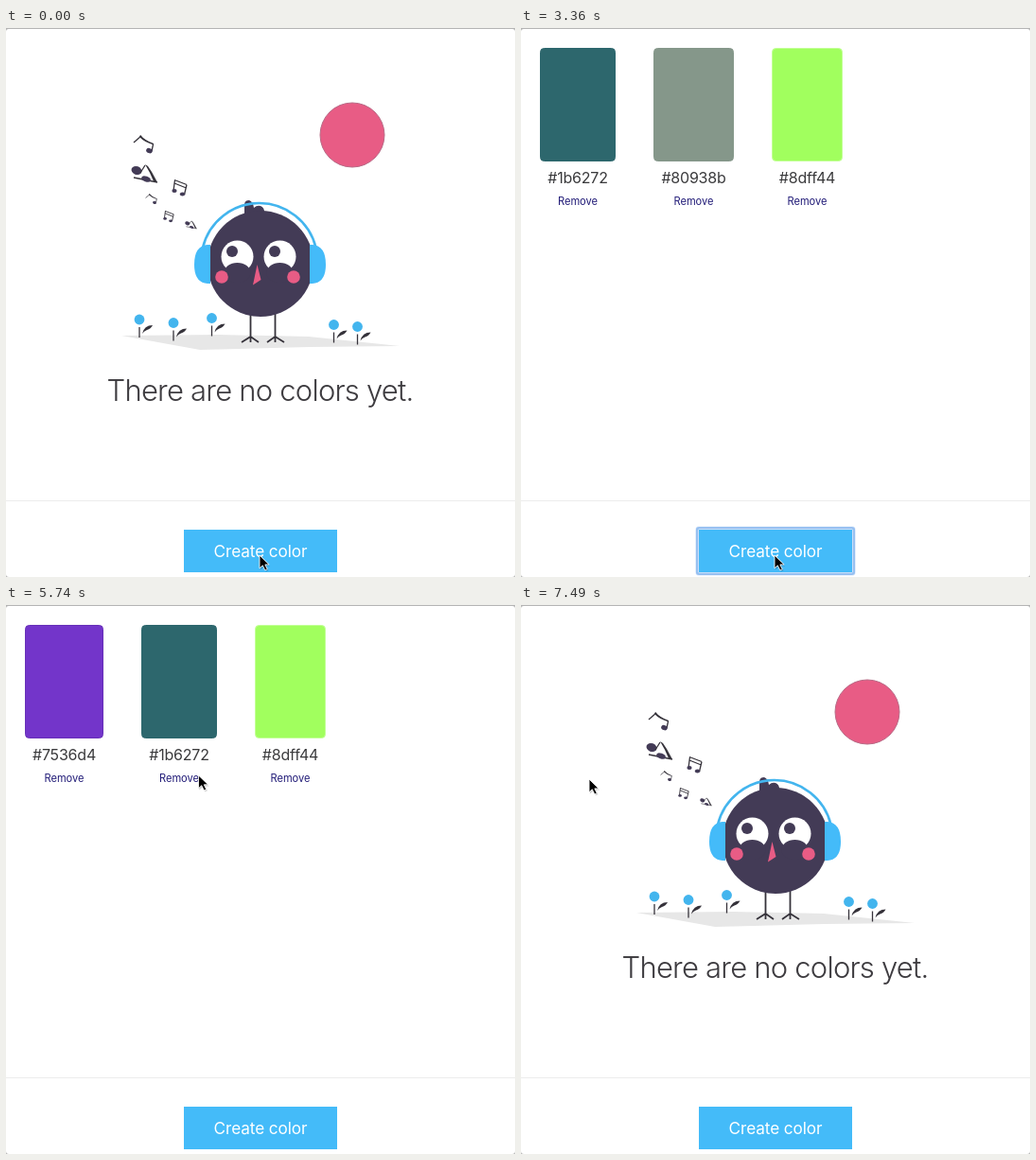
An HTML page that plays this animation: 538x580 px, repeating every 7560 ms.

```html
<!DOCTYPE html>
<html lang="en">
<head>
<meta charset="utf-8">
<title>Color list</title>
<style>
html, body { margin: 0; width: 100%; height: 100%; overflow: hidden; background: #fff; }
svg { display: block; font-family: Inter, Roboto, sans-serif; text-anchor: middle; }
.dark { fill: #433b56; }
.ink { fill: #36333b; }
.pink { fill: #e85c85; }
.sky { fill: #44bbf9; }
.line { fill: none; stroke: #36333b; stroke-width: 1.8; }
.thin { fill: none; stroke: #36333b; stroke-width: 1.3; }
.title { font-size: 31px; font-weight: 300; letter-spacing: -.78px; fill: #3e3c40; }
.label { font-size: 17.2px; letter-spacing: -.1px; fill: #fff; }
.hex { font-size: 16px; letter-spacing: -.2px; fill: #3a3a3c; }
.remove { font-size: 11.1px; fill: #221c78; }
.ring { fill: none; stroke: #97c0f1; stroke-width: 2.6; }
.glow { fill: none; stroke: #dbe9fb; stroke-width: 1; }
</style>
</head>
<body>
<svg width="538" height="580" viewBox="0 0 538 580">
  <defs>
    <g id="flower">
      <circle r="5.4" fill="#43b5ee"/>
      <path class="thin" d="M0 8V19"/>
      <path class="ink" d="M3 15Q5 6 14 6Q12 10 8 11Q5 12 3 15Z"/>
    </g>
    <g id="single">
      <path class="thin" d="M1 8L9 1"/>
      <path class="ink" d="M8 0Q13 6 22 9L22 10.5Q12 7.5 7 2Z"/>
      <path class="thin" d="M21.5 10L20 17"/>
      <ellipse class="dark" cx="17.5" cy="16.5" rx="3.4" ry="2.6" transform="rotate(20 17 16.5)"/>
    </g>
    <g id="double">
      <ellipse class="dark" cx="6" cy="7.5" rx="5.6" ry="4.4" transform="rotate(20 6 7.5)"/>
      <path class="thin" d="M10 10L15 2M3 15L28 20"/>
      <path class="ink" d="M15 1L18 3L22 9L28 20L24 19Q20 9 15 1Z"/>
      <ellipse class="dark" cx="16" cy="16.5" rx="5" ry="2.8" transform="rotate(20 16 16.5)"/>
    </g>
    <g id="beamed">
      <path class="thin" d="M3 .5L16 5.5M3 4L15.5 9M3.5 .5L2 12M16 5.5L13.5 16"/>
      <ellipse class="dark" cx="3" cy="12" rx="2.6" ry="1.9"/>
      <ellipse class="dark" cx="11.5" cy="15.5" rx="2.7" ry="2"/>
    </g>
  </defs>

  <rect width="538" height="580" fill="#b4b4b4"/>
  <rect y="1" width="538" height="579" rx="3" fill="#fff"/>

  <g id="empty">
    <circle class="pink" cx="366" cy="113" r="34" stroke="#b96a86"/>
    <use href="#single" x="134" y="113"/>
    <use href="#double" x="132" y="143"/>
    <use href="#beamed" x="175" y="160"/>
    <use href="#single" transform="translate(147 175) scale(.57)"/>
    <use href="#beamed" transform="translate(166 193) scale(.7)"/>
    <use href="#double" transform="translate(189 203) scale(.45)"/>
    <path fill="#e7e7e7" d="M122 325L225 324L320 326L416 336L320 337L205 340Z"/>
    <use href="#flower" x="141" y="308"/>
    <use href="#flower" x="177" y="311.5"/>
    <use href="#flower" x="217.5" y="306.5"/>
    <use href="#flower" x="346.5" y="313.5"/>
    <use href="#flower" x="371.5" y="315.5"/>
    <path class="line" d="M258.5 302V332M249 332L258.5 326L267 332M284.5 302V332M276 332L284.5 326L294 332"/>
    <path class="dark" d="M252 197V187Q252 182 257 182Q261 183 262 190Q265 187 269 188Q274 190 273 197Z"/>
    <circle class="dark" cx="269" cy="249" r="56"/>
    <path fill="none" stroke="#43b5ee" stroke-width="2.6" d="M208 232A61.5 61.5 0 0 1 327.5 232"/>
    <path class="sky" d="M216 229V270H213Q199 269 199 250Q199 230 213 229ZM321 229V270H324Q338 269 338 250Q338 230 324 229Z"/>
    <g fill="#fff"><circle cx="244.5" cy="241.5" r="17"/><circle cx="289.5" cy="241.5" r="17"/></g>
    <g class="dark">
      <circle cx="239" cy="236" r="6"/><circle cx="284" cy="236" r="6"/>
      <ellipse cx="244.5" cy="258.5" rx="14" ry="10.5"/><ellipse cx="289.5" cy="258.5" rx="14" ry="10.5"/>
    </g>
    <circle class="pink" cx="228" cy="263" r="6.8"/>
    <circle class="pink" cx="304" cy="263" r="6.8"/>
    <path class="pink" d="M265.5 250L261 271.5L269.5 266Z"/>
    <text class="title" x="268.5" y="393.5">There are no colors yet.</text>
  </g>
  <g id="list"></g>

  <path d="M0 499.5H538" stroke="#ececec"/>
  <rect class="sky" x="188" y="530" width="162" height="45"/>
  <text class="label" x="269" y="559">Create color</text>
  <g id="focus"></g>

  <g id="cursor">
    <path d="M1 2V18L5 14.5L8 20L11 19L8.5 13.5H13Z" fill="#000" opacity=".18"/>
    <path d="M0 0V16L3.8 12.5L6.8 18.5L9.6 17.3L6.8 11.5H11.8Z" fill="#000" stroke="#fff"/>
  </g>
</svg>
<script>
const LOOP = 7560, TICK = 70;
const $ = id => document.getElementById(id);

// Each swatch: label, fill, edge, width
const swatches = {
  G: ['#8dff44', '#a1ff5e', '#c2ff96', 75],
  S: ['#80938b', '#85978a', '#85978a', 85],
  T: ['#1b6272', '#2d676d', '#2d676d', 80],
  P: ['#7536d4', '#7335ca', '#6730b8', 83]
};

const lists = [[0, ''], [1400, 'G'], [2380, 'SG'], [3150, 'TSG'], [3990, 'PTSG'],
  [5180, 'PTG'], [6090, 'PG'], [6650, 'G'], [7350, '']];

const focuses = [[0, ''], [1330, 'create'], [5040, 'S'], [5180, ''], [6020, 'T'],
  [6090, ''], [6580, 'P'], [6650, ''], [7280, 'G'], [7350, '']];

// Cursor moves: start, end, from, to
const moves = [
  [4270, 4900, [268, 557], [314, 182]],
  [5320, 5880, [314, 182], [183, 184]],
  [6110, 6300, [183, 184], [72, 184]]
];

const current = (steps, t) => steps.filter(s => s[0] <= t).pop()[1];

const frame = (name, gap, x, y, w, h) =>
  `<rect class="${name}" x="${x - gap}" y="${y - gap}" width="${w + 2 * gap}" height="${h + 2 * gap}" rx="2"/>`;

const ring = (...box) => frame('glow', 3, ...box) + frame('ring', 1.8, ...box);

function drawList(keys, focus) {
  let x = 20, out = '';
  for (const key of keys) {
    const [hex, fill, edge, w] = swatches[key], mid = x + w / 2;
    out += `<rect x="${x + .5}" y="21.5" width="${w - 1}" height="119" rx="4" fill="${fill}" stroke="${edge}"/>
      <text class="hex" x="${mid}" y="164">${hex}</text>
      <text class="remove" x="${mid}" y="187">Remove</text>`;
    if (key === focus) out += ring(x, 175, w, 16);
    x += w + 40;
  }
  return out;
}

function cursorAt(t) {
  const [start, end, a, b] = moves.filter(m => m[0] <= t).pop() || moves[0];
  const u = Math.min(1, Math.max(0, (t - start) / (end - start)));
  const e = u * u * (3 - 2 * u);
  return [a[0] + (b[0] - a[0]) * e, a[1] + (b[1] - a[1]) * e - 20 * u * (1 - u)];
}

let shown;
function draw() {
  const t = Math.floor(performance.now() % LOOP / TICK) * TICK;
  const keys = current(lists, t), focus = current(focuses, t);
  if (shown !== keys + focus) {
    shown = keys + focus;
    $('empty').style.display = keys ? 'none' : '';
    $('list').innerHTML = drawList(keys, focus);
    $('focus').innerHTML = focus === 'create' ? ring(188, 530, 162, 45) : '';
  }
  $('cursor').setAttribute('transform', `translate(${cursorAt(t)}) scale(.86)`);
  requestAnimationFrame(draw);
}
draw();
</script>
</body>
</html>
```
